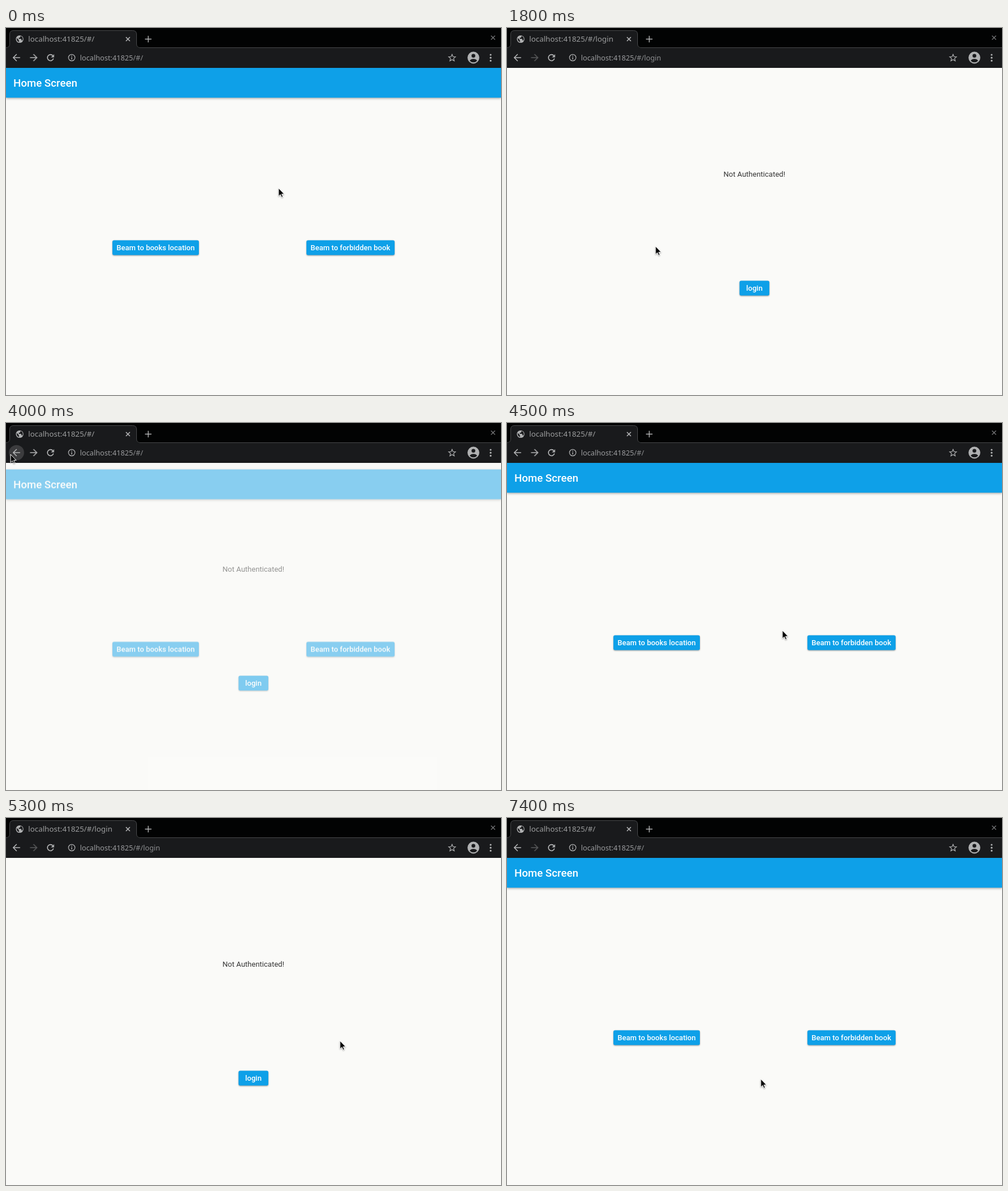
An HTML page that plays this animation: 870x644 px, repeating every 8 s.

```html
<!DOCTYPE html>
<html lang="en">
<head>
<meta charset="utf-8">
<title>Guarded navigation</title>
<style>
  html, body { margin: 0; width: 100%; height: 100%; overflow: hidden; background: #fafaf8; }
  svg { display: block; width: 870px; height: 644px; }

  text { font-family: Roboto, sans-serif; font-size: 13.02px; fill: #fff; }
  .chrome text { font-family: "Noto Sans", sans-serif; font-size: 12.7px; fill: #8c8d8f; }
  .chrome .tab-title { font-size: 13.34px; fill: #9c9d9e; }
  .chrome .host { fill: #9b9c9e; }
  .bar-title { font-size: 18.6px; font-weight: 500; }
  .label { font-weight: 500; text-anchor: middle; }
  .message { fill: #353535; text-anchor: middle; }

  .icon { fill: none; stroke: #b4b5b6; stroke-width: 1.6; }
  .solid { fill: #b0b1b2; }
  .paper { fill: #fafaf8; }
  .bar { fill: #0ea0e8; filter: drop-shadow(0 1.5px 2px rgba(0, 0, 0, .38)); }
  .button { fill: #0ea0e8; filter: drop-shadow(0 1.3px 1.2px rgba(0, 0, 0, .38)); }
  .lift { fill: #0ea0e8; filter: drop-shadow(0 3px 2.5px rgba(0, 0, 0, .35)); }
  .glow { fill: #fff; }
  .arrow { filter: drop-shadow(.8px 1.2px .8px rgba(0, 0, 0, .35)); }
  .pointer path { fill: #050505; stroke: #fff; stroke-width: 1; stroke-linejoin: round; }

  /* Every track is an 8 s loop of held poses; 1.25% is 100 ms. */
  .track { animation: 8s step-end infinite; }
  .path { animation-name: path; }
  .arrow { animation-name: arrow; }
  .hand { animation-name: hand; }
  .route { animation-name: route; }
  .forward { animation-name: forward; }
  .back-glow { animation-name: back-glow; }
  .login-page { animation-name: login-page; }
  .home-return { animation-name: home-return; }
  .books-glow { animation-name: books-glow; }
  .books-ripple { animation-name: books-ripple; }
  .books-lift { animation-name: books-lift; }
  .forbidden-glow { animation-name: forbidden-glow; }
  .forbidden-lift { animation-name: forbidden-lift; }
  .login-glow { animation-name: login-glow; }

  @keyframes path {
    0% { transform: translate(479px, 281px); }
    8.75% { transform: translate(448px, 306px); }
    10% { transform: translate(362px, 366px); }
    11.25% { transform: translate(281px, 392px); }
    12.5% { transform: translate(261px, 383px); }
    33.75% { transform: translate(186px, 284px); }
    35% { transform: translate(119px, 199px); }
    37.5% { transform: translate(110px, 176px); }
    38.75% { transform: translate(86px, 130px); }
    40% { transform: translate(56px, 86px); }
    41.25% { transform: translate(28px, 55px); }
    42.5% { transform: translate(14px, 45px); }
    43.75% { transform: translate(8px, 55px); }
    51.25% { transform: translate(28px, 76px); }
    52.5% { transform: translate(112px, 148px); }
    53.75% { transform: translate(238px, 234px); }
    55% { transform: translate(372px, 312px); }
    56.25% { transform: translate(484px, 364px); }
    57.5% { transform: translate(560px, 388px); }
    58.75% { transform: translate(583px, 391px); }
    60% { transform: translate(587px, 391px); }
    77.5% { transform: translate(528px, 428px); }
    78.75% { transform: translate(485px, 452px); }
    80% { transform: translate(456px, 464px); }
    81.25% { transform: translate(449px, 462px); }
    82.5%, 100% { transform: translate(446px, 458px); }
  }
  @keyframes arrow {
    0%, 21.25%, 63.75%, 91.25%, 100% { opacity: 1; }
    12.5%, 58.75%, 80% { opacity: 0; }
  }
  @keyframes hand {
    0%, 21.25%, 63.75%, 91.25%, 100% { opacity: 0; }
    12.5%, 58.75%, 80% { opacity: 1; }
  }
  @keyframes route {
    0%, 46.25%, 91.25%, 100% { opacity: 0; }
    20%, 63.75% { opacity: 1; }
  }
  @keyframes forward {
    0%, 46.25% { opacity: 1; }
    20%, 63.75%, 100% { opacity: .42; }
  }
  @keyframes back-glow {
    0%, 51.25%, 100% { opacity: 0; }
    41.25% { opacity: .08; }
    46.25% { opacity: .15; }
  }
  @keyframes login-page {
    0%, 51.25%, 92.5%, 100% { opacity: 0; transform: none; }
    21.25%, 65% { opacity: .52; transform: translateY(11.5px); }
    22.5%, 66.25% { opacity: 1; transform: none; }
    63.75% { opacity: .34; transform: translateY(32.5px); }
  }
  @keyframes home-return {
    0%, 51.25%, 92.5%, 100% { opacity: 0; transform: none; }
    48.75% { opacity: .33; transform: translateY(32.5px); }
    50%, 91.25% { opacity: .48; transform: translateY(11.5px); }
  }
  @keyframes books-glow {
    0%, 22.5%, 100% { opacity: 0; }
    12.5% { opacity: .05; }
    21.25% { opacity: .24; }
  }
  @keyframes books-ripple {
    0%, 21.25%, 100% { opacity: 0; }
    20% { opacity: .08; }
  }
  @keyframes books-lift {
    0%, 22.5%, 100% { opacity: 0; }
    18.75% { opacity: 1; }
  }
  @keyframes forbidden-glow {
    0%, 66.25%, 100% { opacity: 0; }
    60% { opacity: .06; }
    62.5% { opacity: .12; }
    63.75% { opacity: .26; }
  }
  @keyframes forbidden-lift {
    0%, 66.25%, 100% { opacity: 0; }
    62.5% { opacity: 1; }
  }
  @keyframes login-glow {
    0%, 92.5%, 100% { opacity: 0; }
    83.75% { opacity: .06; }
    90% { opacity: .12; }
    91.25% { opacity: .26; }
  }
</style>
</head>
<body>
<svg viewBox="0 0 870 644">
  <defs>
    <clipPath id="viewport"><rect y="70" width="870" height="574"/></clipPath>
    <clipPath id="books-shape"><use href="#books-box"/></clipPath>
    <rect id="books-box" x="187" y="372.6" width="152" height="26" rx="3"/>
    <rect id="forbidden-box" x="528" y="372.6" width="155" height="26" rx="3"/>
    <rect id="login-box" x="408.7" y="443.5" width="52.4" height="26" rx="3"/>
    <path id="nav-arrow" d="M6.3 0H-5.6M.3-6L-5.7 0L.3 6"/>
    <path id="cross" d="M-3.5-3.5L3.5 3.5M3.5-3.5L-3.5 3.5"/>
    <g id="home">
      <rect class="bar" y="70" width="870" height="52.3"/>
      <text class="bar-title" x="13" y="103.3">Home Screen</text>
      <use class="button" href="#books-box"/>
      <use class="button" href="#forbidden-box"/>
      <text class="label" x="263" y="390.2">Beam to books location</text>
      <text class="label" x="605.2" y="390.2">Beam to forbidden book</text>
    </g>
  </defs>

  <g clip-path="url(#viewport)">
    <rect class="paper" y="70" width="870" height="574"/>
    <use class="lift track books-lift" href="#books-box"/>
    <use class="lift track forbidden-lift" href="#forbidden-box"/>
    <use href="#home"/>
    <use class="glow track books-glow" href="#books-box"/>
    <g clip-path="url(#books-shape)"><circle class="glow track books-ripple" cx="261" cy="385" r="21"/></g>
    <use class="glow track forbidden-glow" href="#forbidden-box"/>

    <g class="track login-page">
      <rect class="paper" y="70" width="870" height="574"/>
      <text class="message" x="434.8" y="261">Not Authenticated!</text>
      <use class="button" href="#login-box"/>
      <text class="label" x="434.8" y="461">login</text>
      <use class="glow track login-glow" href="#login-box"/>
    </g>

    <g class="track home-return">
      <rect class="paper" y="70" width="870" height="574"/>
      <use href="#home"/>
    </g>
  </g>

  <g class="chrome">
    <rect width="870" height="35" fill="#020303"/>
    <rect y="35" width="870" height="35" fill="#191a1c"/>
    <path d="M0 34.5Q6.5 34.5 6.5 28V11Q6.5 4.5 13 4.5H222.500Q229.500 4.5 229.500 11V28Q229.500 34.5 236 34.5H870V36H0Z" fill="none"/>
    <path d="M0 35.500Q6.5 35.500 6.5 28.500V11Q6.5 4.5 13 4.5H222.500Q229.500 4.5 229.500 11V28.500Q229.500 35.500 236 35.500Z" fill="#191a1c"/>
    <path d="M0 34.500Q6.5 34.500 6.5 28V11Q6.5 4.5 13 4.5H222.500Q229.500 4.5 229.500 11V28Q229.500 34.500 236 34.500H870" fill="none" stroke="#48494b"/>

    <circle class="solid" cx="24" cy="19.500" r="6.600"/>
    <path d="M19 17.500L22.500 21V22.500L23.500 24.500Q19 24 18.800 19ZM25.500 14.500L24.500 17H22.500V19H26.500L27.500 21.500L28.800 22Q31 17 26.500 14.200Z" fill="#191a1c"/>
    <text class="tab-title" x="39" y="24.300">localhost:41825/#/<tspan class="track route-slot"></tspan></text>
    <use class="icon" href="#cross" x="214.300" y="19.500"/>
    <path class="icon" d="M244.300 19.500H255.700M250 13.800V25.200" style="stroke-width:1.4"/>
    <use class="icon" href="#cross" x="856" y="17" style="stroke:#77787a;stroke-width:1.3"/>

    <circle class="glow track back-glow" cx="18.500" cy="52" r="13.300"/>
    <use class="icon" href="#nav-arrow" x="18.500" y="52"/>
    <g class="track forward"><use class="icon" href="#nav-arrow" transform="translate(48.500 52) scale(-1 1)"/></g>
    <path class="icon" d="M82.300 48.500A5.400 5.400 0 1 0 83.400 53.500"/>
    <path class="solid" d="M84.500 46V51.500H79Z"/>
    <circle class="icon" cx="115.500" cy="52" r="5.700" style="stroke-width:1.2"/>
    <path class="icon" d="M115.500 51.200V55.200M115.500 48.500V50" style="stroke-width:1.4"/>
    <text x="130" y="56.800"><tspan class="host">localhost:41825</tspan>/#/</text>
    <path class="icon" d="M784 46.200L785.700 50.300L790 50.600L786.700 53.400L787.800 57.700L784 55.400L780.200 57.700L781.300 53.400L778 50.600L782.300 50.300Z" style="stroke-width:1.2"/>
    <circle class="solid" cx="821.500" cy="52" r="10.400"/>
    <circle cx="821.500" cy="48.700" r="3.300" fill="#191a1c"/>
    <path d="M815 57.500Q817 54.200 821.500 54.200T828 57.500Q825.500 60.300 821.500 60.300T815 57.500Z" fill="#191a1c"/>
    <g class="solid">
      <circle cx="851.800" cy="47" r="1.600"/>
      <circle cx="851.800" cy="52.200" r="1.600"/>
      <circle cx="851.800" cy="57.400" r="1.600"/>
    </g>
    <g class="track route">
      <text class="tab-title" x="155.600" y="24.300">login</text>
      <text x="241" y="56.800">login</text>
    </g>
  </g>

  <g class="pointer track path">
    <g class="track arrow"><path d="M0 0V14.300L3.300 11.300L5.600 16.200L7.800 15.200L5.600 10.400H10Z"/></g>
    <g class="track hand"><path d="M-1.300-.500Q.200-2 1.500-.500V3.500L5.500 4.200Q7 4.600 6.800 6.500L6 10V13.500H-2V11L-5 7.200Q-5 5.300-3.300 6L-1.300 7.500Z"/></g>
  </g>
</svg>
</body>
</html>
```
